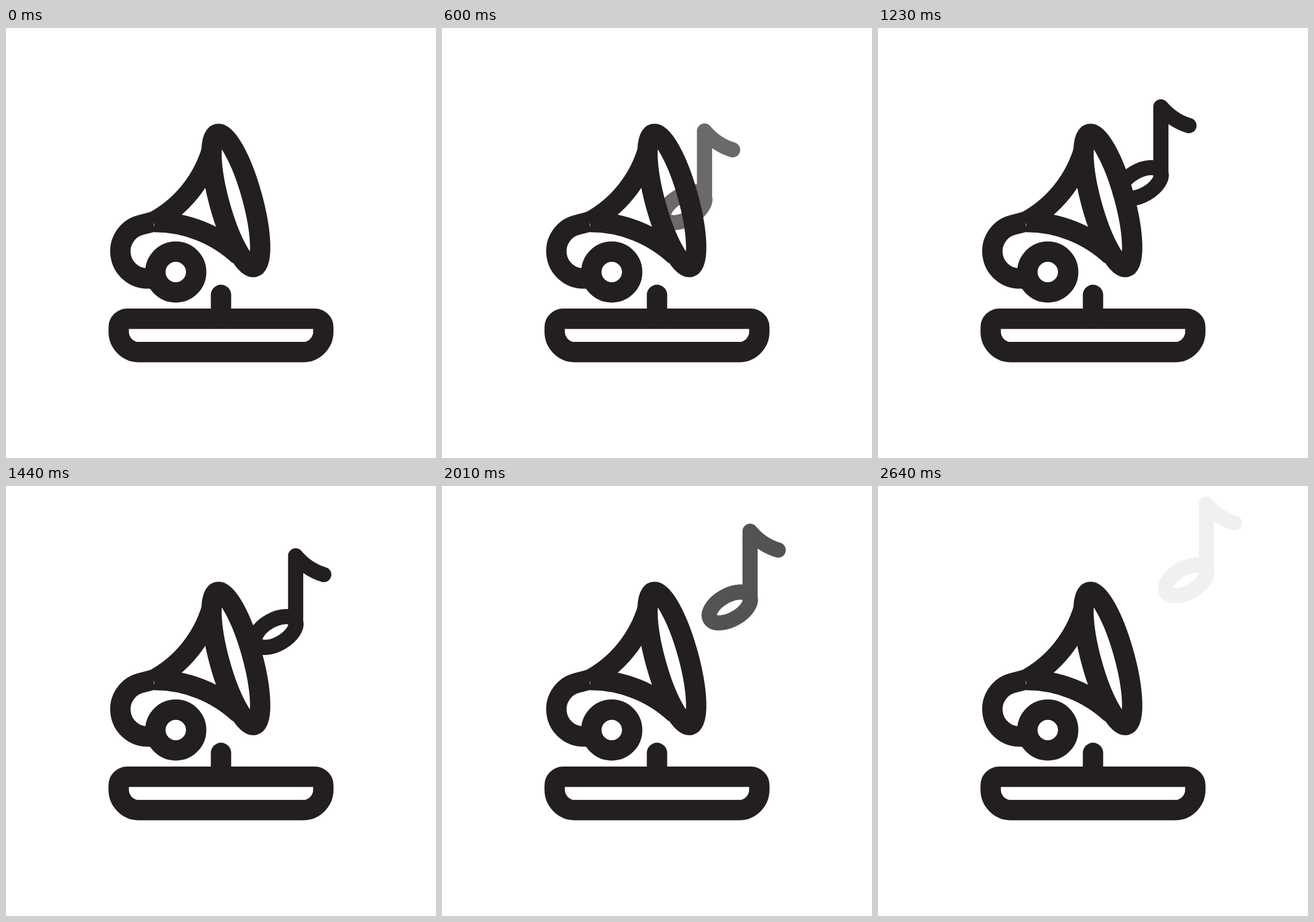
An HTML page with a canvas that plays this animation: 748x748 px, repeating every 2700 ms.

```html
<!DOCTYPE html>
<html lang="en">
<head>
<meta charset="utf-8">
<title>Gramophone</title>
<style>
  html, body { margin: 0; width: 100%; height: 100%; overflow: hidden; background: #fff; }
  canvas { display: block; width: 748px; height: 748px; }
</style>
</head>
<body>
<canvas id="stage" width="748" height="748"></canvas>
<script>
const ctx = document.getElementById('stage').getContext('2d');

const INK = '#231f20';
const LOOP = 2700;
const STEP = 30;
const FADE = 900;
const END = LOOP - 2 * STEP;

const radians = degrees => degrees * Math.PI / 180;

function tiltedEllipse(x, y, long, short, degrees) {
  const path = new Path2D();
  path.ellipse(x, y, long, short, radians(degrees), 0, Math.PI * 2);
  return path;
}

const gramophone = [
  // base
  new Path2D('M211 505.7H537A15 15 0 0 1 552 520.7V528.3A35.5 35.5 0 0 1 516.5 563.8H231.5A35.5 35.5 0 0 1 196 528.3V520.7A15 15 0 0 1 211 505.7Z'),
  // arm
  new Path2D('M262 435.7H247.6A47.3 47.3 0 0 1 235.3 342.4L255.7 337.1'),
  // horn sides
  new Path2D('M255.5 337.8A210.5 210.5 0 0 0 358.5 210.5'),
  new Path2D('M258 337.6A215.5 215.5 0 0 1 406.3 396.2'),
  tiltedEllipse(399.8, 300, 119.9, 28.9, 74.55),
  tiltedEllipse(295.3, 424.5, 35.5, 35.5, 0)
];
const post = new Path2D('M374 464.3V505');

// One path, so overlapping strokes share a single opacity.
const note = new Path2D('M571.3 150V31.7Q592 56 620.2 64.3');
note.addPath(tiltedEllipse(536, 164.2, 39.5, 20.9, -30));

function drawGramophone() {
  ctx.lineWidth = 35.4;
  ctx.lineCap = 'butt';
  gramophone.forEach(part => ctx.stroke(part));
  ctx.lineCap = 'round';
  ctx.stroke(post);
}

function drawNote(time) {
  const left = END - time;
  const slowStart = Math.max(0, 1250 - time);
  ctx.save();
  ctx.translate(-0.0562 * left, 0.0748 * left - 1.18e-5 * slowStart ** 2);
  ctx.globalAlpha = Math.min(1, time / FADE, (LOOP - time) / FADE);
  ctx.lineWidth = 26.4;
  ctx.lineCap = ctx.lineJoin = 'round';
  ctx.stroke(note);
  ctx.restore();
}

function render(now) {
  const time = Math.min(END, Math.floor(now % LOOP / STEP) * STEP);
  ctx.fillStyle = '#fff';
  ctx.fillRect(0, 0, 748, 748);
  ctx.strokeStyle = INK;
  if (time >= 3 * STEP) drawNote(time);
  drawGramophone();
}

let start;
function tick(now) {
  start ??= now;
  render(now - start);
  requestAnimationFrame(tick);
}

render(0);
requestAnimationFrame(tick);
</script>
</body>
</html>
```
